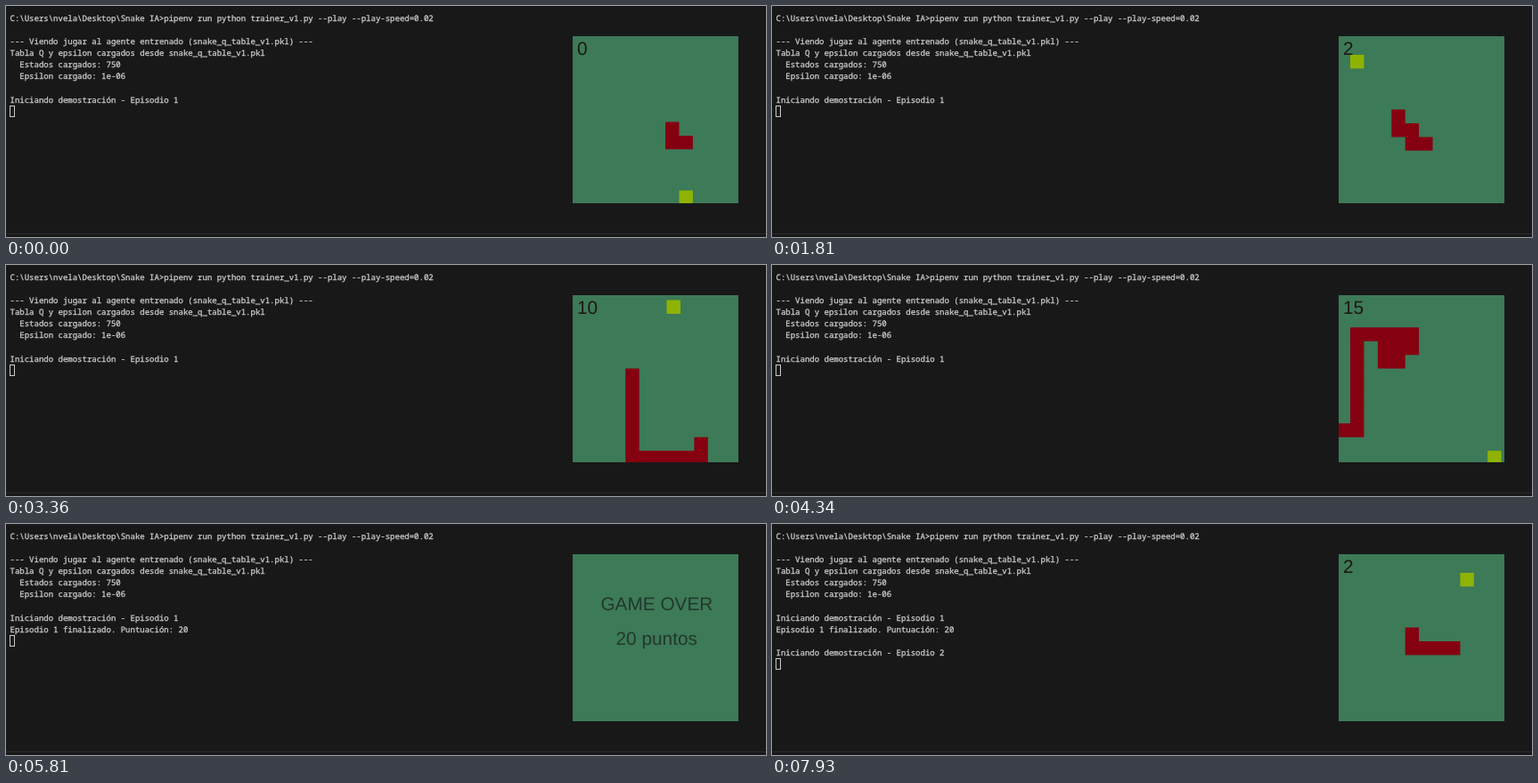
An HTML page with a canvas for the animation above (8000 ms loop, 853 by 260 pixels).

```html
<!DOCTYPE html>
<html lang="es">
<head>
<meta charset="utf-8">
<title>Snake</title>
<style>
  html, body { margin: 0; height: 100%; overflow: hidden; background: #181818; }
  canvas { display: block; }
</style>
</head>
<body>
<canvas width="853" height="260"></canvas>
<script>
const ctx = document.querySelector('canvas').getContext('2d');
ctx.textRendering = 'geometricPrecision';

const LOOP = 8000, START = 990, GAME_OVER = 5810, RESTART = 7790;
const UPDATE = 70, MOVES_PER_UPDATE = 3.085;
const CELL = 15.42, LINE = 13.07;
const BOARD = [636, 34, 186, 188];

const intro = [
  'C:\\Users\\nvela\\Desktop\\Snake IA>pipenv run python trainer_v1.py --play --play-speed=0.02',
  '',
  '--- Viendo jugar al agente entrenado (snake_q_table_v1.pkl) ---',
  'Tabla Q y epsilon cargados desde snake_q_table_v1.pkl',
  '  Estados cargados: 750',
  '  Epsilon cargado: 1e-06',
  '',
  'Iniciando demostración - Episodio 1',
];
const finished = [...intro, 'Episodio 1 finalizado. Puntuación: 20'];
const restarted = [...finished, '', 'Iniciando demostración - Episodio 2'];

// The snake turns at every goal, then runs straight until level with the next.
// Goals are "column,row"; "~" marks a zigzag approach, "." a turn without food.
function playGame(goals) {
  const path = [[7, 6], [7, 7], [8, 7]];
  const foods = [];
  const pos = [8, 7];
  let axis = 0;
  for (const goal of goals.split(' ')) {
    const target = goal.split(',').map(parseFloat);
    const zigzag = goal.endsWith('~');
    if (!zigzag) axis ^= 1;
    while (pos[0] !== target[0] || pos[1] !== target[1]) {
      if (zigzag) axis ^= 1;
      if (pos[axis] === target[axis]) axis ^= 1;
      pos[axis] += Math.sign(target[axis] - pos[axis]);
      path.push([...pos]);
    }
    if (!goal.endsWith('.')) foods.push({ cell: target, eatenAt: path.length - 1 });
  }
  return { path, foods };
}

const firstGame = playGame(
  '8,11 11,1 10,11. 6,7. 1,1~ 5,11 0,8~ 8,10 6,6 9,4 9,11 4,11 ' +
  '7,0 0,10 1,9 5,2 3,3 11,11~ 4,6 8,2 1,0 9,11 2,4');
const secondGame = playGame('5,5 8,6 9,1');

function fillCells(cells, color, shift) {
  ctx.beginPath();
  for (const [col, row] of cells) {
    ctx.rect(633.6 + col * CELL - shift, 39.5 + row * CELL - shift, CELL, CELL);
  }
  ctx.fillStyle = color;
  ctx.fill();
}

function drawLabel(text, x, y, color, align) {
  ctx.font = '20.8px "Liberation Sans", Arial, sans-serif';
  ctx.textAlign = align;
  ctx.fillStyle = color;
  ctx.fillText(text, x, y);
}

function drawGame({ path, foods }, updates) {
  const head = 2 + Math.round(updates * MOVES_PER_UPDATE);
  const score = foods.filter(food => food.eatenAt <= head).length;
  const shift = updates ? 0 : 1.5;
  fillCells([foods[score].cell], '#8fb303', shift);
  fillCells(path.slice(head - score - 2, head + 1), '#850010', shift);
  drawLabel(score, 641, 55, '#201613', 'left');
}

function drawTerminal(lines) {
  ctx.font = '9px "Noto Sans Mono", "DejaVu Sans Mono", monospace';
  ctx.textAlign = 'left';
  ctx.fillStyle = ctx.strokeStyle = '#cccccc';
  ctx.lineWidth = 0.3;
  lines.forEach((line, i) => {
    ctx.fillText(line, 4.5, 17.1 + i * LINE);
    ctx.strokeText(line, 4.5, 17.1 + i * LINE);
  });
  ctx.lineWidth = 1;
  ctx.strokeRect(4.5, Math.floor(7.6 + lines.length * LINE) + 0.5, 5, 12);
}

function draw(t) {
  const over = t >= GAME_OVER && t < RESTART;
  ctx.fillStyle = '#181818';
  ctx.fillRect(0, 0, 853, 260);
  ctx.fillStyle = '#2b2b2b';
  ctx.fillRect(0, 256, 853, 1);
  drawTerminal(t < GAME_OVER ? intro : over ? finished : restarted);

  ctx.save();
  ctx.beginPath();
  ctx.rect(...BOARD);
  ctx.clip();
  ctx.fillStyle = '#3d7a58';
  ctx.fillRect(...BOARD);
  if (over) {
    drawLabel('GAME OVER', 730.4, 97, '#22382b', 'center');
    drawLabel('20 puntos', 730.2, 136, '#22382b', 'center');
  } else if (t < GAME_OVER) {
    drawGame(firstGame, t < START ? 0 : Math.floor((t - 900) / UPDATE));
  } else {
    drawGame(secondGame, 1 + Math.floor((t - RESTART) / UPDATE));
  }
  ctx.restore();
}

function frame() {
  draw(performance.now() % LOOP);
  requestAnimationFrame(frame);
}
frame();
</script>
</body>
</html>
```
